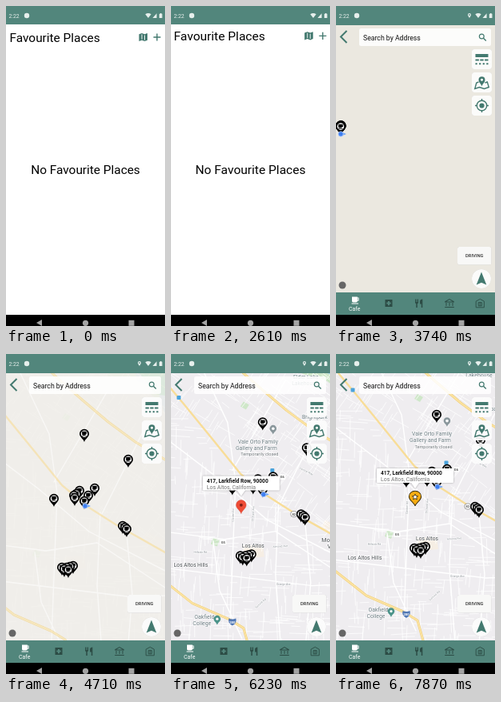
An HTML page that plays this animation: 199x400 px, repeating every 7990 ms.

```html
<!DOCTYPE html>
<html lang="en">
<head>
<meta charset="utf-8">
<title>Favourite Places</title>
<style>
  html, body { margin: 0; width: 100%; height: 100%; overflow: hidden; background: #fff; }
  svg { display: block; width: 100vw; height: 100vh; }
  text { font-family: Roboto, sans-serif; }
  .teal { fill: #52867c; }
  .icon { fill: #43796f; }
  .line { fill: none; stroke: #43796f; stroke-width: 1.4; }
  .card { fill: #fff; fill-opacity: .92; filter: drop-shadow(0 .5px .7px #0003); }
  .dim { fill: #2c4c45; }
  .mid { text-anchor: middle; }
  .road { fill: none; stroke-linecap: round; stroke-linejoin: round; }
  #labels text { fill: #6d7378; stroke: #fff; stroke-width: 1; paint-order: stroke; text-anchor: middle; }
  #labels .city { fill: #4c5054; font-size: 6.7px; }
  #labels .big { font-size: 7.4px; }
  #labels .poi { fill: #6a7a80; font-size: 6.9px; }
  #labels .tiny { fill: #90959b; font-size: 3.5px; }
  #labels .shield { fill: #555; font-size: 4.2px; stroke: none; font-weight: 700; }
</style>
</head>
<body>
<svg viewBox="0 0 199 400" preserveAspectRatio="none">
  <defs>
    <clipPath id="mapArea"><rect y="24" width="199" height="334"/></clipPath>
    <path id="drop" d="M0 0C-1-4-6-6-6-10.3A6 6 0 0 1 6-10.3C6-6 1-4 0 0Z"/>
    <path id="cup" d="M-4-4H2.8V-3.2H4.6V.8H2.8V1.5Q2.8 3-1 3Q-4 3-4 1.5ZM2.8-2V-.3H3.6V-2ZM-4.5 4H4V5H-4.5Z"/>
    <g id="cafe">
      <use href="#drop"/>
      <circle cy="-10.3" r="4.3" fill="#fff"/>
      <use href="#cup" transform="translate(0 -10.4) scale(.7)"/>
    </g>
    <path id="star" d="M0-3.6L1.1-1.2L3.6-1L1.7.7L2.3 3.2L0 1.9L-2.3 3.2L-1.7.7L-3.6-1L-1.1-1.2Z"/>
    <rect id="stop" x="-2.5" y="-2.5" width="5" height="5" rx="1" fill="#4aa3dc"/>
    <path id="freeway" d="M30-4L62 28L95 57L128 85L162 110L199 132L240 152M-60 272L-28 296L10 326L56 346L74 357L86 400"/>
    <path id="avenue" d="M-60 10L-30 42L0 78L36 122L70 164L104 192L137 213L199 248L240 270"/>
  </defs>

  <rect width="199" height="400" fill="#fff"/>

  <g id="home">
    <text x="4.5" y="44.8" font-size="15.4">Favourite Places</text>
    <text x="99.5" y="210" font-size="15.4" class="mid">No Favourite Places</text>
    <path class="icon" d="M166.5 35.3L170 34L173.5 35.3L177 34V42.7L173.5 44L170 42.7L166.5 44Z"/>
    <path d="M170 35.4V41.6M173.5 36.5V42.6" stroke="#fff" stroke-width=".9"/>
    <path class="line" d="M184.5 39H193.5M189 34.5V43.5"/>
  </g>

  <g id="mapScreen">
    <rect y="23" width="199" height="363" fill="#ebe8e0"/>
    <g clip-path="url(#mapArea)">
      <g id="world">
        <g id="base">
          <rect x="-400" y="-400" width="1000" height="1200" fill="#f1efea"/>
          <path fill="#e4ecda" d="M150 0H240V58L186 50Z"/>
        </g>
        <g id="detail">
          <rect x="-100" y="-60" width="400" height="520" fill="#efedf0"/>
          <path fill="#cfe7c9" d="M124 0H240V72L196 62L178 48L150 40L128 30ZM36 244l8 3l-3 8l-8-3ZM74 74l7 4l-4 6l-7-4Z"/>
          <path fill="#a9d5f2" d="M158 0H199V74L194 62L190 42L164 34Z"/>
          <path fill="#f6eee4" d="M72 166l22 10l-5 9l-21-9ZM72 254l26-1l2 15l-24 2ZM176 222l24 12l-6 10l-23-12Z"/>
          <path id="streets" class="road" stroke="#fff" stroke-width=".75"/>
        </g>
        <path id="avenues" class="road" stroke="#fff" stroke-width="1.4"
          d="M-60 92L40 168L104 222L240 292M18 24L54 100L64 174L57 357M60 160L126 48M120 200L172 96M118 198L114 290L122 400M-60 232L50 246L114 236L199 292M-40 280L60 292L160 304L240 300M36 248L44 310L72 370M150 214L158 300L150 400"/>
        <g id="highways">
          <use href="#freeway" class="road" stroke="#f0cd75" stroke-width="3"/>
          <use href="#freeway" class="road" stroke="#fbe3a2" stroke-width="2"/>
          <use href="#avenue" class="road" stroke="#f8dd98" stroke-width="2.4"/>
        </g>
        <g id="labels">
          <text class="poi" x="152" y="45">Elder Lake</text>
          <text class="poi" x="151" y="53">Lakehouse</text>
          <text class="poi" x="163" y="95">Brightpark</text>
          <use href="#drop" fill="#8a979c" transform="translate(111 115) scale(.72)"/>
          <circle cx="111" cy="107.6" r="1.8" fill="#fff"/>
          <text class="poi" x="92" y="126">Vale Orto Family</text>
          <text class="poi" x="90" y="134">Gallery and Farm</text>
          <text x="94" y="141.5" font-size="5.6">Temporarily closed</text>
          <text class="poi" x="79" y="184" style="fill:#4587a1">Merrow</text>
          <use href="#stop" x="110" y="160"/>
          <use href="#stop" x="-7" y="69"/>
          <text class="city" x="86" y="256.5">Los Altos</text>
          <text class="city" x="8" y="280.5">Los Altos Hills</text>
          <text class="city big" x="187" y="249.5">Mountain</text>
          <text class="city big" x="187" y="257.5">View</text>
          <text class="poi" x="25" y="345.5">Oakfield</text>
          <text class="poi" x="22" y="353.5">College</text>
          <use href="#drop" fill="#4b9389" transform="translate(41 353) scale(.72)"/>
          <circle cx="41" cy="345.600" r="1.600" fill="#fff"/>
          <rect x="133" y="211" width="8" height="7" rx="3" fill="#fff" stroke="#666" stroke-width=".6"/>
          <text class="shield" x="137" y="216.2">82</text>
          <path d="M55.500 345Q60 347 64.500 345Q66 351 60 354Q54 351 55.500 345Z" fill="#5178b5"/>
          <text class="shield" x="60" y="351" style="fill:#fff">280</text>
          <rect x="44.500" y="246.500" width="8" height="6.500" rx="1" fill="#fff"/>
          <text class="shield" x="48.500" y="251.400">G5</text>
          <rect x="118.500" y="165" width="8" height="6.500" rx="1" fill="#fff"/>
          <text class="shield" x="122.500" y="169.900">G6</text>
          <text class="tiny" x="120" y="256" transform="rotate(-4 120 256)">Almond Ave</text>
          <text class="tiny" x="124" y="303">Orange Ave</text>
          <text class="tiny" x="20" y="263">Hillside Rd</text>
          <text class="tiny" x="62" y="216" transform="rotate(-88 62 216)">Garden Rd</text>
          <text class="tiny" x="87" y="214" transform="rotate(-86 87 214)">Orchard Ave</text>
          <text class="tiny" x="96" y="327" transform="rotate(-42 96 327)">Summit Rd</text>
          <text class="tiny" x="152" y="162" transform="rotate(27 152 162)">Central Way</text>
        </g>
      </g>
      <g id="pins"></g>
      <g id="me">
        <path d="M2-2L7 0L2 2Z" fill="#6ba4f8"/>
        <circle r="3.2" fill="#3f7ff0" stroke="#cfe0fc" stroke-width=".7"/>
      </g>
      <g id="spot">
        <g id="redPin">
          <use href="#drop" fill="#ee4b35" stroke="#c93a28" stroke-width=".4" transform="scale(1.05)"/>
          <circle cy="-10.8" r="1.9" fill="#7d1d14"/>
        </g>
        <g id="goldPin">
          <use href="#drop" fill="#f6ac12" stroke="#3a2d0c" stroke-width=".8" transform="scale(1.27 1.15)"/>
          <use href="#star" y="-11.3" fill="#fff" stroke="#2c2410" stroke-width=".8"/>
        </g>
        <g id="callout">
          <path d="M-47-47H47Q48-47 48-46V-30Q48-29 47-29H5L0-22L-5-29H-47Q-48-29-48-30V-46Q-48-47-47-47Z" fill="#fff" style="filter:drop-shadow(0 .5px 1px #0005)"/>
          <text x="-43" y="-38.7" font-size="6.6" font-weight="700" fill="#111">417, Larkfield Row, 90000</text>
          <text x="-43" y="-31" font-size="6.9" fill="#777">Los Altos, California</text>
        </g>
      </g>
      <circle cx="8" cy="349" r="4.5" fill="#666"/>
    </g>

    <path class="line" d="M13.5 31L6 38.5L13.5 46" style="stroke-width:2"/>
    <rect x="29" y="28" width="165" height="22" rx="2.5" fill="#fff" fill-opacity=".86"/>
    <text x="34" y="42.6" font-size="8.7" fill="#111">Search by Address</text>
    <circle class="line" cx="182.3" cy="38" r="2.9" style="stroke-width:1.2"/>
    <path class="line" d="M184.5 40.2L187.8 43.5"/>

    <rect class="card" x="170" y="54" width="25" height="25" rx="3"/>
    <path class="icon" d="M174.5 60H190.5V64H174.5Z"/>
    <path class="line" d="M174.5 67.6H190.5" stroke-dasharray="4.4 1.4" style="stroke-width:2"/>
    <path class="line" d="M174.5 72.2H190.5" stroke-dasharray="2.2 2.4" style="stroke-width:2"/>

    <rect class="card" x="170" y="83" width="25" height="25" rx="3"/>
    <path class="line" d="M178.5 95L175.8 96L173.8 103.5L179.5 101.5L185.5 103.5L191.3 101.5L189.3 95L186.5 96"/>
    <path class="icon" fill-rule="evenodd" d="M182.5 100.5C182 97.5 178.5 96 178.5 92.3A4 4 0 0 1 186.5 92.3C186.5 96 183 97.5 182.5 100.5ZM182.5 90.7a1.6 1.6 0 1 0 .01 0Z"/>

    <rect class="card" x="170" y="112" width="25" height="25" rx="3"/>
    <circle class="line" cx="182.5" cy="124.5" r="6.2"/>
    <circle class="icon" cx="182.5" cy="124.5" r="3.1"/>
    <path class="line" d="M182.5 116V119M182.5 130V133M174 124.5H177M188 124.5H191"/>

    <rect class="card" x="152" y="301" width="42.5" height="22.5" rx="2.5" style="fill:#f8f8f7;fill-opacity:1"/>
    <text x="173.3" y="314.3" font-size="5.8" font-weight="500" fill="#333" class="mid">DRIVING</text>
    <circle class="card" cx="182" cy="341" r="12"/>
    <path class="icon" d="M182 332.5L188.3 348.5L182 345.7L175.7 348.5Z"/>

    <g transform="translate(0 .6)">
      <rect class="teal" y="357.4" width="199" height="29"/>
      <use href="#cup" x="24" y="367" fill="#fff"/>
      <text x="23.2" y="380" font-size="6.9" fill="#fff" class="mid">Cafe</text>
      <g class="dim">
        <path fill-rule="evenodd" d="M61.5 366.5H70.5V375.5H61.5ZM65 368.3V370H63.3V372H65V373.7H67V372H68.7V370H67V368.3Z"/>
        <path d="M99 366h.9v3.5h.7V366h.9v3.5h.7V366h.9v4q0 1.4-1.3 1.6v4.7h-1.5v-4.7Q99 371.4 99 370ZM105 368.5Q105.3 366 108.3 366V376.3H106.8V372H105Z"/>
        <path fill-rule="evenodd" d="M142 365.3L147.8 368.6V369.8H136.2V368.6ZM142 366.5L138.2 368.8H145.8ZM137.5 370.5h1v4h-1ZM141.5 370.5h1v4h-1ZM145.500 370.500h1v4h-1ZM136.200 375.300H147.800V376.300H136.200Z"/>
      </g>
      <path d="M175.200 376.200V368.500L180.300 365.700L185.400 368.500V376.200ZM178.200 370H182.400V374.200H178.200ZM180.300 370V374.200" fill="none" stroke="#2c4c45" stroke-width=".9"/>
    </g>
    <rect class="teal" y="22" width="199" height="2"/>
  </g>

  <rect class="teal" width="199" height="23"/>
  <g fill="#e6efec">
    <text x="3.500" y="14.600" font-size="6.800">2:22</text>
    <circle cx="26" cy="12" r="3.200"/>
    <path d="M174.300 10.300Q178 7.500 181.700 10.300L178 15ZM183.500 15H188.600V9.300ZM191.800 9.800H193V9H194.500V9.800H195.500V15H191.800Z"/>
    <path id="gps" fill-rule="evenodd" d="M167 15.300C166.500 13.500 165 12.700 165 11A2 2 0 0 1 169 11C169 12.700 167.500 13.500 167 15.300ZM167 10.200a.8.8 0 1 0 .01 0Z"/>
  </g>
  <rect y="386" width="199" height="14" fill="#000"/>
  <g fill="#a3a3a3">
    <path d="M38 396L45 392V400Z"/>
    <circle cx="99.500" cy="396.300" r="3.600"/>
    <rect x="153.500" y="392.800" width="7" height="7"/>
  </g>
</svg>
<script>
const LOOP = 7990;
const $ = id => document.getElementById(id);

// Tip positions of the cafes at full zoom
const cafes = [[98, 110], [153, 142], [60, 191], [111, 178], [92, 181], [88, 185],
  [85, 187], [86, 190], [103, 187], [98, 194], [146, 225], [149, 227], [151, 229],
  [84, 275], [80, 276], [76, 277], [70, 277], [73, 279], [78, 280]];
const centre = [99, 190];
const spotAt = [71, 214];

// Each list holds [start time, value...]; values change in hard steps
const homeScale = [[0, 1], [2610, 1.01], [2720, 1.05]];
const mapScale = [[0, 0], [2830, .985], [2980, 1]];
const origin = [[0, -60, 139], [3740, 6, 160], [3850, 28, 167], [4000, 52, 175],
  [4110, 68, 180], [4210, 80, 184], [4320, 90, 187], [4500, 99, 190]];
const zoom = [[0, .01], [4500, .45], [4610, .85], [4710, 1]];
const ground = [[0, 0], [4500, .5], [4610, .8], [4710, 1]];
const detail = [[0, 0], [4710, .12], [4870, .4], [4980, .7], [5090, 1]];
const pan = [[0, 0], [6120, .3], [6210, .6], [6290, .85], [6490, 1]];

const pick = (steps, t) => steps.filter(s => s[0] <= t).pop().slice(1);
const show = (id, on) => $(id).style.display = on ? '' : 'none';
const scaled = k => `translate(99.5 204) scale(${k}) translate(-99.5 -204)`;

// Side streets: aligned with the slanted avenue north of it, upright to the south
function makeStreets() {
  let seed = 11;
  const rnd = () => (seed = seed * 16807 % 2147483647) / 2147483647;
  let d = '';
  for (let i = 0; i < 750; i++) {
    const x = rnd() * 320 - 70, y = rnd() * 400 - 10;
    const north = y < 100 + x * .8;
    const angle = (north ? .6 : .03) + (rnd() < .5 ? Math.PI / 2 : 0) + (rnd() - .5) * .2;
    const len = 8 + rnd() * 26;
    d += `M${x.toFixed(1)} ${y.toFixed(1)}l${(Math.cos(angle) * len).toFixed(1)} ${(Math.sin(angle) * len).toFixed(1)}`;
  }
  $('streets').setAttribute('d', d);
}

const pins = cafes.map(() => {
  const pin = document.createElementNS('http://www.w3.org/2000/svg', 'use');
  pin.setAttribute('href', '#cafe');
  $('pins').append(pin);
  return pin;
});

function draw(t) {
  const [m] = pick(mapScale, t);
  show('home', !m);
  show('mapScreen', m);
  show('gps', t >= 2980);
  $('home').setAttribute('transform', scaled(pick(homeScale, t)[0]));
  $('mapScreen').setAttribute('transform', scaled(m || 1));

  const [z] = pick(zoom, t), [p] = pick(pan, t), [ox, oy] = pick(origin, t);
  const place = ([x, y]) => [ox + 28 * p + (x - centre[0]) * z, oy - 24 * p + (y - centre[1]) * z];
  const move = (el, at) => el.setAttribute('transform', `translate(${place(at)})`);
  pins.forEach((pin, i) => move(pin, cafes[i]));
  move($('me'), centre);
  move($('spot'), spotAt);
  $('world').setAttribute('transform', `translate(${place([0, 0])}) scale(${z})`);

  const [g] = pick(ground, t), [d] = pick(detail, t);
  $('world').style.opacity = g;
  $('detail').style.opacity = d;
  $('avenues').style.opacity = .5 + d / 2;
  $('highways').style.opacity = .55 + d * .45;
  $('labels').style.opacity = d < .4 ? 0 : d;

  show('spot', t >= 5490);
  show('redPin', t < 7350);
  show('goldPin', t >= 7350);
  show('callout', t >= 6120);
}

makeStreets();
const start = performance.now();
(function tick() {
  draw((performance.now() - start) % LOOP);
  requestAnimationFrame(tick);
})();
</script>
</body>
</html>
```
